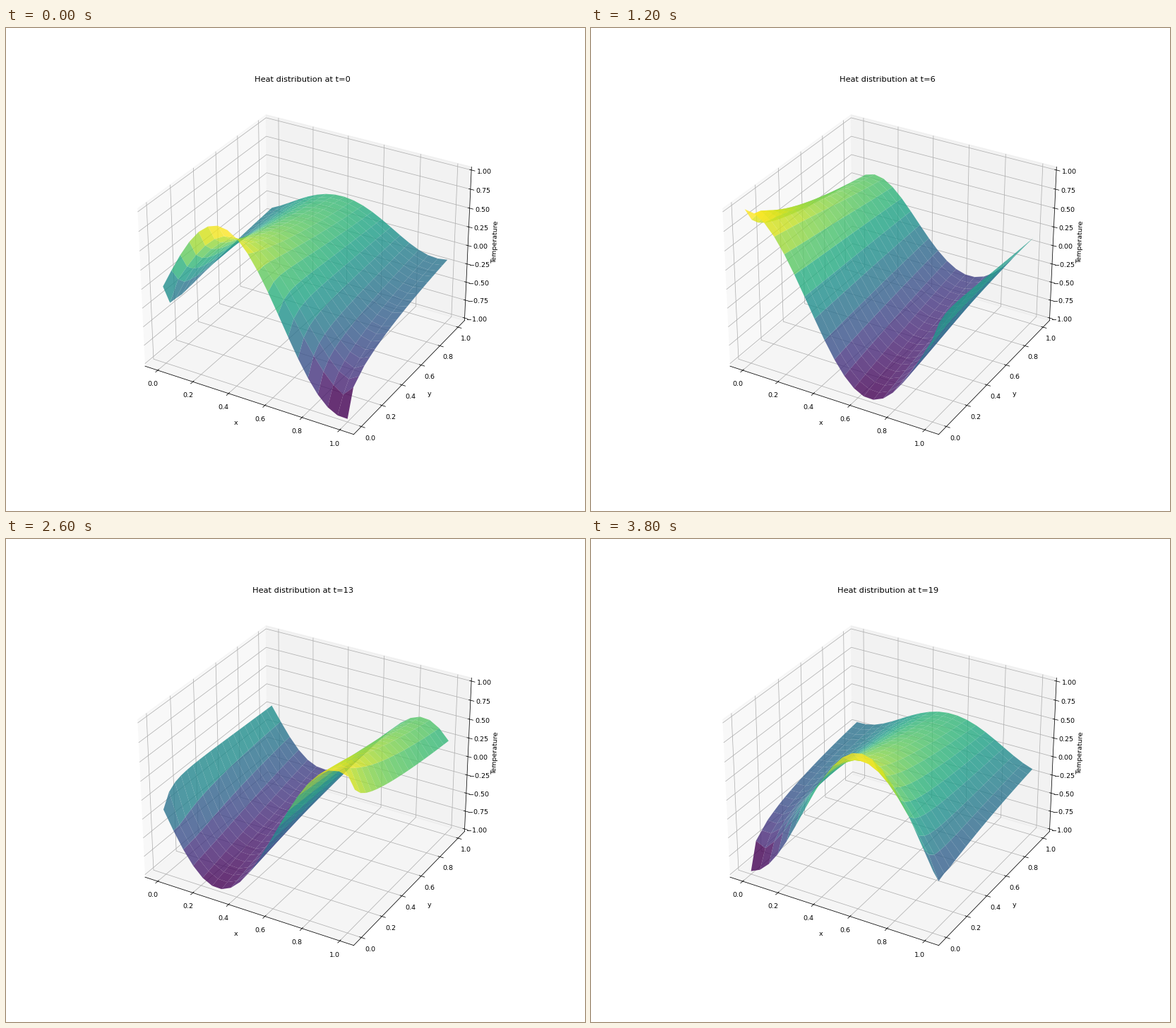
A matplotlib script for the animation above (4 s loop, 820 by 683 pixels).

```python
import numpy as np
import matplotlib.pyplot as plt
from matplotlib.animation import FuncAnimation

N = 20            # points per axis, also the number of animation frames
ALPHA = 0.01      # diffusivity
WAVE = 4.825      # wave number of the starting profile
DPI = 820 / 12


def solve_heat():
    """Explicit diffusion with periodic edges; the first axis is the step."""
    grid = np.linspace(0, 1, N)
    step = grid[1]
    rate = ALPHA * step / step**2
    u = np.sin(WAVE * (grid[:, None] + grid[None, :]))
    layers = [u]
    for _ in range(N - 1):
        near = sum(np.roll(u, s, axis) for s in (1, -1) for axis in (0, 1))
        u = u + rate * (near - 4 * u)
        layers.append(u)
    return grid, np.array(layers)


grid, heat = solve_heat()
X, Y = np.meshgrid(grid, grid)

# the tiny excess keeps the pixel size from being floored one short
fig = plt.figure(figsize=(820.01 / DPI, 683.01 / DPI), dpi=DPI)
ax = fig.add_subplot(111, projection="3d")


def draw(t):
    ax.clear()
    ax.plot_surface(X, Y, heat[:, :, t], cmap="viridis", alpha=0.8)
    ax.set_xlabel("x")
    ax.set_ylabel("y")
    ax.set_zlabel("Temperature")
    ax.set_title(f"Heat distribution at t={t}")
    return []


anim = FuncAnimation(fig, draw, frames=N, interval=200, repeat=True, repeat_delay=0)
plt.show()
```
